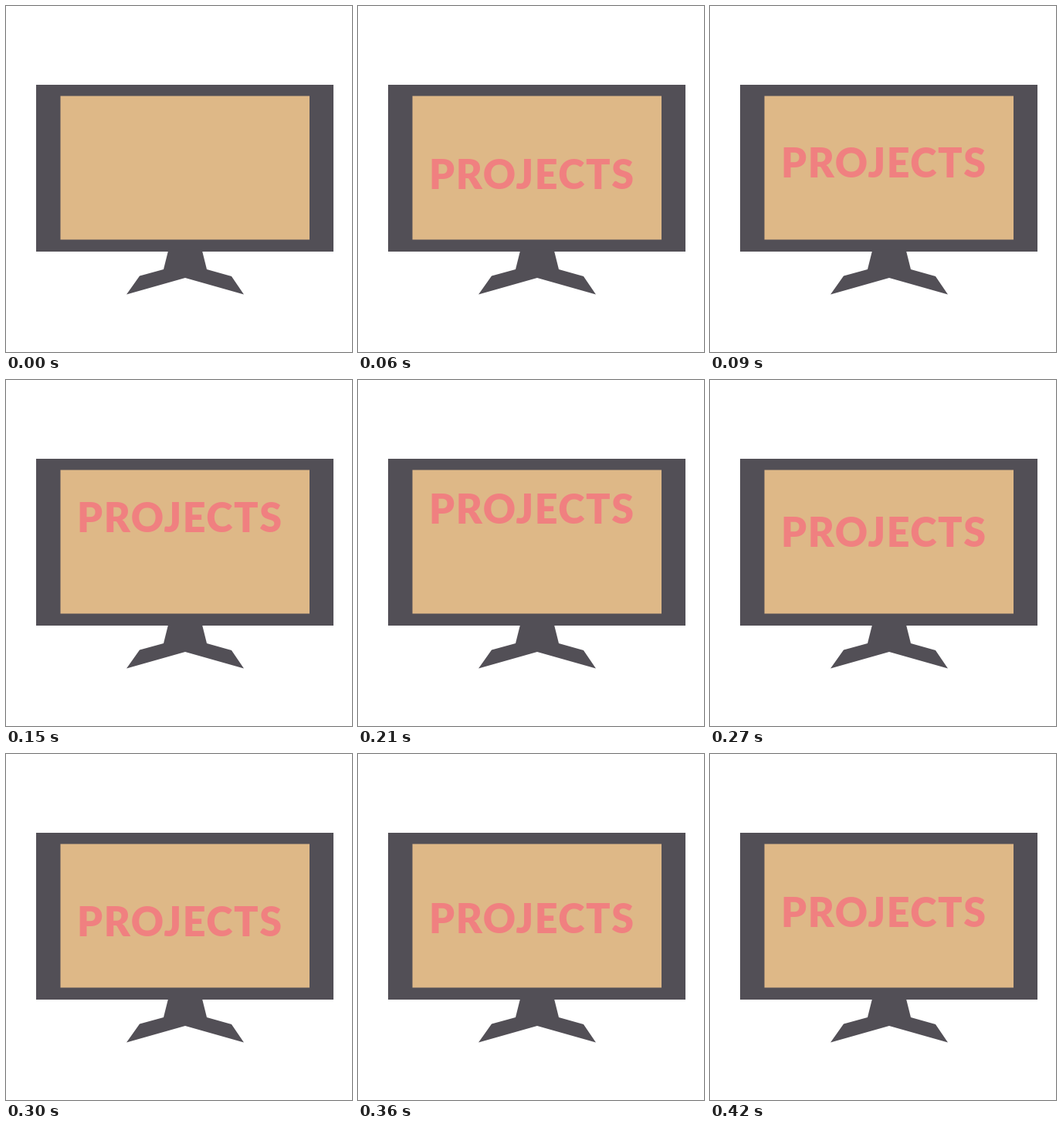
These frames come from a looping animation (448x448 px, 0.84 s). An HTML page:

```html
<!DOCTYPE html>
<html lang="en">
<head>
<meta charset="utf-8">
<title>Projects screen</title>
<style>
  html, body { margin: 0; width: 100%; height: 100%; overflow: hidden; background: #fff; }
  svg { display: block; width: 100vw; height: 100vh; }
  text { font: 900 52px Lato, sans-serif; letter-spacing: 1.6px; fill: #f08080; }
</style>
</head>
<body>
<svg viewBox="0 0 448 448">
  <g fill="#524f56">
    <path d="M39 102H424V318H39Z"/>
    <path d="M210 317H254L260 341L292 350L308 373.5L232 352L156 373.5L173 349.5L204 341Z"/>
  </g>
  <path d="M70.5 116.5H393V302.5H70.5Z" fill="#deb887"/>
  <text id="word" x="92" y="224">PROJECTS</text>
</svg>
<script>
  const LOOP = 840, STEP = 30;
  // Vertical offset from rest at each step: rise, overshoot, drop, settle.
  const offsets = [29, 13, -2, -15, -27, -38, -38.5, -27, -8, 12, 12, 8, 4, 0];
  const word = document.getElementById("word");

  function draw() {
    const step = Math.floor(performance.now() % LOOP / STEP);
    const offset = offsets[Math.min(step, offsets.length) - 1];
    word.setAttribute("visibility", step ? "visible" : "hidden");
    word.setAttribute("transform", `translate(0 ${offset ?? 0})`);
    requestAnimationFrame(draw);
  }
  draw();
</script>
</body>
</html>
```
